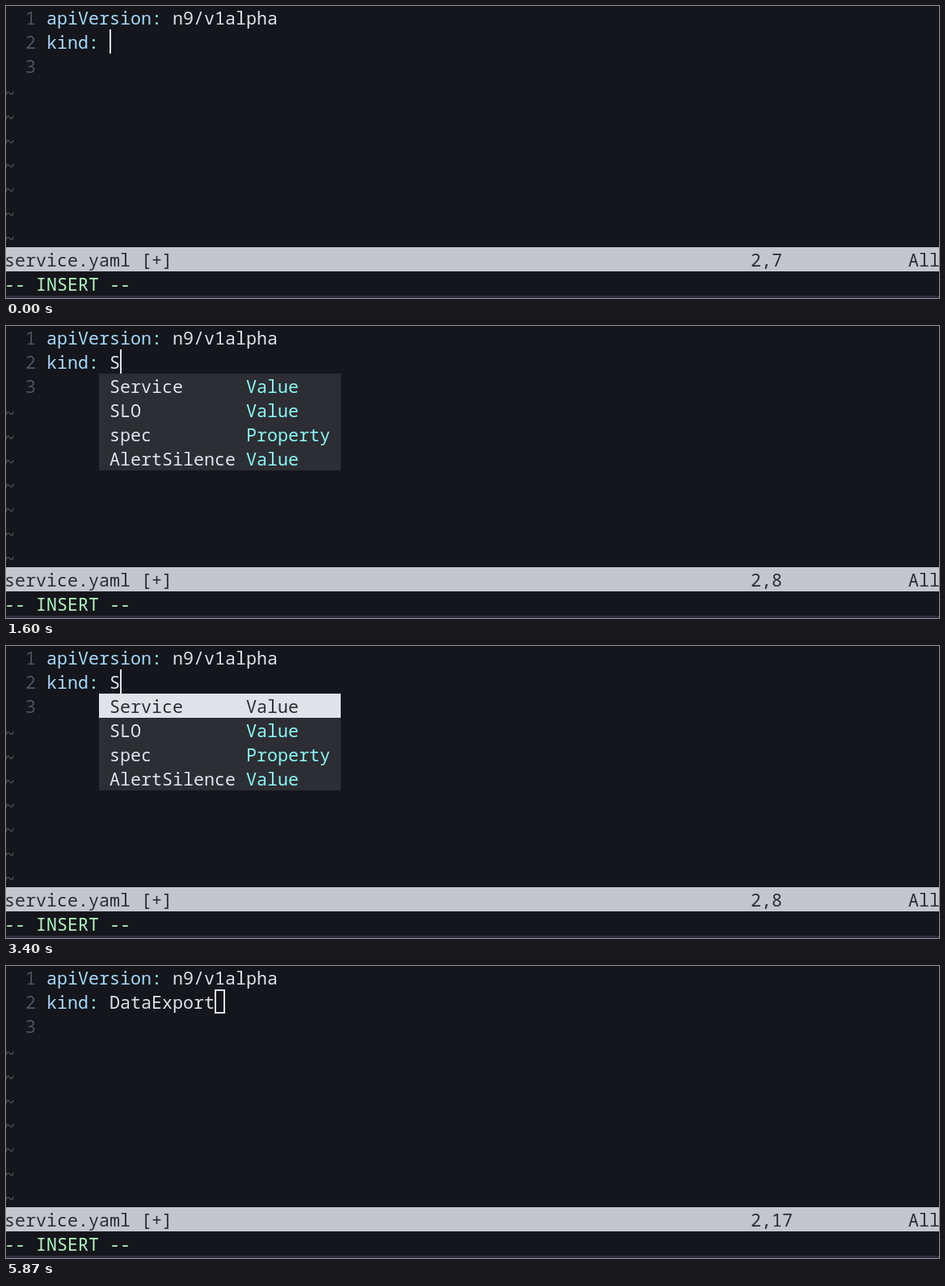
These frames come from a looping animation (1154x362 px, 6.2 s). An HTML page with a canvas:

```html
<!DOCTYPE html>
<html lang="en">
<meta charset="utf-8">
<title>service.yaml</title>
<style>
  html, body { margin: 0; width: 100%; height: 100%; overflow: hidden; background: #14161b; }
  canvas { display: block; }
</style>
<canvas id="stage" width="1154" height="362"></canvas>
<script>
const ctx = document.getElementById("stage").getContext("2d");
const LOOP = 6200, CELL = 13, ROW = 30;
const BG = "#14161b", FG = "#e0e2ea", DIM = "#4f5258", MENU = "#2c2e33",
  BAR = "#c4c6cd", BLUE = "#a6dbff", CYAN = "#8cf8f7", GREEN = "#b3f6c0";

const sMenu = [["Service", "Value"], ["SLO", "Value"], ["spec", "Property"], ["AlertSilence", "Value"]];
const sloMenu = [["SLO", "Value"]];
const dataMenu = [["DataExport", "Value"]];

// start time, typed text, completion menu, selected item
const steps = [
  [0, ""],
  [200, "S"],
  [270, "S", sMenu],
  [1200, ""],
  [1530, "S"],
  [1600, "S", sMenu],
  [1730, "SL", sloMenu],
  [2470, "S", sloMenu],
  [2530, "S", sMenu],
  [2930, "S", sMenu, 0],
  [3130, "S", sMenu, 1],
  [3270, "S", sMenu, 0],
  [3470, "S", sMenu],
  [3800, ""],
  [4270, "D"],
  [4330, "D", dataMenu],
  [4400, "Da", dataMenu],
  [4530, "Dat", dataMenu],
  [4600, "Data", dataMenu],
  [4800, "Data", dataMenu, 0],
  [5130, "DataExport"],
];
const BLUR_AT = 5870; // the window loses focus and the cursor turns hollow

const colX = col => col * CELL - 2;
const rowY = row => row * ROW - 1;

function box(color, x, y, w, h) {
  ctx.fillStyle = color;
  ctx.fillRect(x, y, w, h);
}

function text(str, col, row, color, drop = 0) {
  ctx.fillStyle = color;
  ctx.fillText(str, colX(col), rowY(row) + 24 + drop);
}

function drawMenu(items, selected) {
  const nameWidth = Math.max(...items.map(i => i[0].length));
  const kindWidth = Math.max(...items.map(i => i[1].length));
  items.forEach(([name, kind], i) => {
    const row = i + 2, on = i === selected;
    box(on ? FG : MENU, colX(9), rowY(row), (nameWidth + kindWidth + 3) * CELL, ROW);
    text(name, 10, row, on ? MENU : FG);
    text(kind, 11 + nameWidth, row, on ? MENU : CYAN);
  });
}

function drawCursor(col, hollow) {
  const x = colX(col), y = rowY(1);
  if (!hollow) return box(FG, x, y, 2, ROW);
  ctx.strokeStyle = FG;
  ctx.lineWidth = 2;
  ctx.strokeRect(x + 1, y + 1, CELL - 2, ROW - 2);
}

function draw(t) {
  const [, typed, menu, selected] = steps.findLast(s => s[0] <= t);
  ctx.font = "21.667px 'Noto Sans Mono', monospace";
  box(BG, 0, 0, 1154, 362);

  for (let row = 0; row < 3; row++) text(String(row + 1), 2, row, DIM);
  for (let row = 3; row < 10; row++) text("~", 0, row, DIM, 4);
  text("apiVersion", 4, 0, BLUE);
  text(":", 14, 0, CYAN);
  text("n9/v1alpha", 16, 0, FG);
  text("kind", 4, 1, BLUE);
  text(":", 8, 1, CYAN);
  text(typed, 10, 1, FG);
  if (menu) drawMenu(menu, selected);
  drawCursor(10 + typed.length, t >= BLUR_AT);

  box(BAR, 0, rowY(10), 1154, ROW);
  text("service.yaml [+]", 0, 10, MENU);
  text("2," + (7 + typed.length), 71, 10, MENU);
  text("All", 86, 10, MENU);
  text("-- INSERT --", 0, 11, GREEN);
  box("#2c2f3a", 0, 359, 1154, 3);
}

let start;
function tick(now) {
  start ??= now;
  draw((now - start) % LOOP);
  requestAnimationFrame(tick);
}
draw(0);
requestAnimationFrame(tick);
</script>
</html>
```
